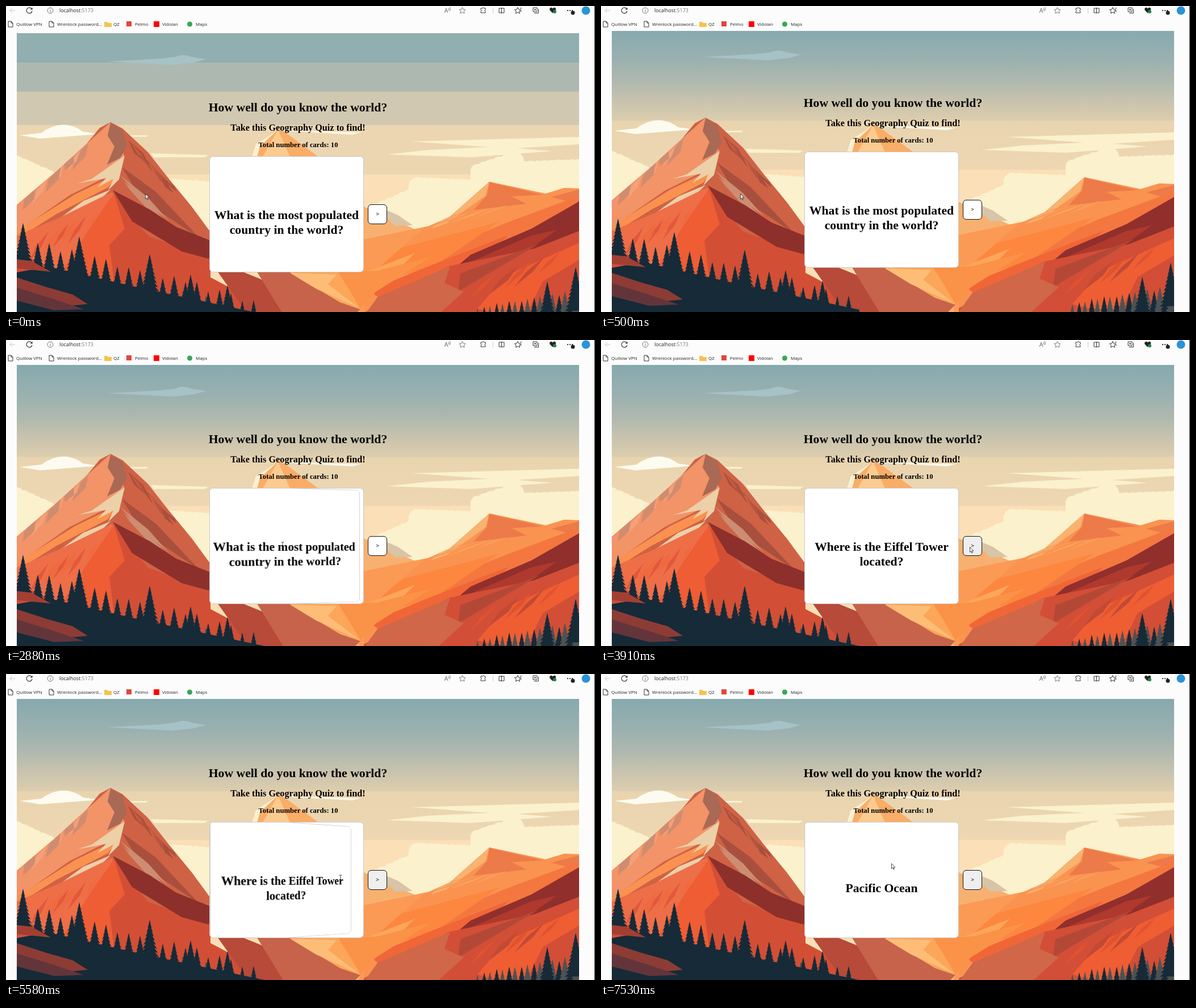
Write an HTML page that moves like this. It is 1037x540 px and loops after 8000 ms.

```html
<!DOCTYPE html>
<html lang="en">
<head>
<meta charset="utf-8">
<title>Geography quiz</title>
<style>
html, body { margin: 0; width: 100%; height: 100%; overflow: hidden; background: #fcfcfc; }
#stage { position: absolute; left: 0; top: 0; width: 1037px; height: 540px; overflow: hidden; }
#stage svg { position: absolute; left: 0; top: 0; }
#view { position: absolute; inset: 44px 0 0; overflow: hidden; }
#page { position: absolute; left: 0; top: -44px; width: 1037px; height: 560px; animation: scroll 8s step-end infinite; }
#bands { animation: bands 8s step-end infinite; }
.bar { font-family: "Open Sans", "Noto Sans", sans-serif; }
.head { font-family: "Liberation Serif", serif; font-weight: bold; text-anchor: middle; }
#card {
  position: absolute; left: 358px; top: 261px; width: 272px; height: 205px; box-sizing: border-box;
  border: 1px solid #c8c8c8; border-radius: 7px; background: #fff; overflow: hidden; perspective: 675px;
}
#flip { position: absolute; inset: 0; transform-style: preserve-3d; animation: flip 8s ease infinite; }
.face {
  position: absolute; inset: -1px; box-sizing: border-box; padding-top: 30px;
  display: grid; place-content: center; place-items: center; text-align: center; white-space: pre;
  border: 1px solid #d0d0d0; border-radius: 7px; background: #fff; backface-visibility: hidden;
  font: bold 21.7px/25.5px "Liberation Serif", serif; color: #000;
}
.back { transform: rotateY(180deg); }
.face span { grid-area: 1 / 1; animation: first 8s step-end infinite; }
.face span:nth-child(2) { animation-name: second; }
.face span:nth-child(3) { animation-name: third; }
#next {
  position: absolute; left: 637px; top: 346px; width: 34px; height: 35px; box-sizing: border-box;
  border: 1.4px solid #111; border-radius: 6px; background: #fff; animation: press 8s step-end infinite;
  font: 9.5px/31px "Liberation Sans", sans-serif; text-align: center; color: #000;
}
#cursor { position: absolute; left: 0; top: 0; animation: move 8s linear infinite; }
#cursor svg { overflow: visible; }
#arrow { animation: arrow 8s step-end infinite; }
#beam { animation: beam 8s step-end infinite; }
#edge { position: absolute; inset: 0; border: solid #222; border-width: 0 1px 0 0; }

@keyframes scroll {
  0% { transform: translateY(4px); }
  4.625% { transform: none; }
  6.25% { transform: translateY(-4px); }
  8.125%, 100% { transform: none; }
}
@keyframes bands { 0% { opacity: 1; } 1.5%, 100% { opacity: 0; } }
@keyframes flip {
  0%, 20.85% { transform: rotateY(0deg); }
  28.35%, 30.75% { transform: rotateY(180deg); }
  38.25%, 56.5% { transform: rotateY(0deg); }
  64%, 65.5% { transform: rotateY(180deg); }
  73%, 87.2% { transform: rotateY(0deg); }
  94.7%, 100% { transform: rotateY(180deg); }
}
@keyframes first { 0% { visibility: visible; } 45.375%, 100% { visibility: hidden; } }
@keyframes second { 0%, 77.375% { visibility: hidden; } 45.375% { visibility: visible; } 100% { visibility: hidden; } }
@keyframes third { 0% { visibility: hidden; } 77.375%, 100% { visibility: visible; } }
@keyframes press { 0% { background: #fff; } 41.9%, 100% { background: #efefef; } }
@keyframes move {
  0%, 11.4% { transform: translate(245px, 331px); }
  11.5%, 13.8% { transform: translate(423px, 331px); }
  13.9%, 22.2% { transform: translate(481.5px, 362px); }
  36%, 37.5% { transform: translate(487px, 362px); }
  43.5%, 49% { transform: translate(649px, 365px); }
  55%, 71% { transform: translate(589px, 360px); }
  75.8%, 77.3% { transform: translate(643px, 364px); }
  80.9% { transform: translate(622px, 361px); }
  84.25%, 100% { transform: translate(511px, 334px); }
}
@keyframes arrow { 0%, 41.9%, 74.2%, 100% { opacity: 1; } 13.875%, 55% { opacity: 0; } }
@keyframes beam { 0%, 41.9%, 74.2%, 100% { opacity: 0; } 13.875%, 55% { opacity: 1; } }
</style>
</head>
<body>
<div id="stage">
  <div id="view"><div id="page">
    <svg width="1037" height="560">
      <defs>
        <linearGradient id="sky" gradientUnits="userSpaceOnUse" x1="0" y1="44" x2="0" y2="300">
          <stop offset="0" stop-color="#86a9ae"/>
          <stop offset=".2" stop-color="#99b0b0"/>
          <stop offset=".36" stop-color="#aeb8ae"/>
          <stop offset=".5" stop-color="#c8c3ae"/>
          <stop offset=".63" stop-color="#dccdae"/>
          <stop offset=".64" stop-color="#e9d4b0"/>
          <stop offset=".97" stop-color="#eed7b2"/>
          <stop offset=".975" stop-color="#fadfb7"/>
        </linearGradient>
        <clipPath id="frame"><path d="M19 44H1009V560H19Z"/></clipPath>
        <path id="leftPeak" d="M184 201 205 212 250 254 286 300 327 350 360 395V475L520 560H19V347L93 284 142 239 165 211Z"/>
        <path id="rightPeak" d="M736 388 781 368 851 306 950 327 983 317 1009 318V560H630V480Z"/>
        <clipPath id="inLeft"><use href="#leftPeak"/></clipPath>
        <clipPath id="inRight"><use href="#rightPeak"/></clipPath>
      </defs>
      <g clip-path="url(#frame)">
        <path fill="url(#sky)" d="M19 44H1010V560H19Z"/>
        <g id="bands">
          <path fill="#91aeb1" d="M19 44H1010V97H19Z"/>
          <path fill="#adb9b0" d="M19 96H1010V148H19Z"/>
          <path fill="#d0c8b0" d="M19 147H1010V206H19Z"/>
          <path fill="#ecd6b1" d="M19 206H1010V293H19Z"/>
        </g>
        <path fill="#a6c2c6" d="M178 94 270 89 297 86Q312 79 328 86L352 90 330 96 292 100Z"/>
        <path fill="#fdfbef" d="M24 224 62 220Q100 192 136 218L164 222 60 230Z"/>
        <path fill="#fbf1cd" d="M190 224H250L247 227H190ZM255 256 356 259 350 263H260ZM714 235 1009 227V240L900 247 962 252 818 263 671 258 744 250 850 245Z"/>
        <path fill="#fbf8ea" d="M430 213 625 219 610 223Z"/>
        <g id="clouds" fill="#fbf1cd"></g>

        <path fill="#f9ad67" d="M433 262 438 242 479 213 493 220 550 262Z"/>
        <path fill="#fbf0d2" d="M433 262 439 241 479 214 447 244 442 262Z"/>
        <path fill="#fbcb90" d="M452 262 479 214 500 262Z"/>

        <path fill="#f7b070" d="M630 350 725 392 800 370V560H480V470H630Z"/>
        <path fill="#d8c4a6" d="M646 346 690 365 716 383 685 384Z"/>
        <path fill="#fb9a55" d="M630 408 770 379 830 400 790 560H620Z"/>

        <use href="#rightPeak" fill="#fa9350"/>
        <g clip-path="url(#inRight)">
          <path fill="#f9b270" d="M748 389 802 347 851 306 844 331 775 380Z"/>
          <path fill="#ed7a49" d="M851 307 945 329 890 332 916 345 823 356 847 330ZM960 333 1009 320V346Z"/>
          <g id="rightGlow"></g>
          <path fill="#f47740" d="M1009 331 880 379 812 407 740 463 875 440 1009 357Z"/>
          <path fill="#fd873f" d="M690 424 868 377 745 461 630 484Z"/>
          <path fill="#f06637" d="M640 498 732 460 885 400 848 439 680 530Z"/>
          <path fill="#902f2c" d="M1009 341 925 389 818 435 780 467 800 505 1009 440Z"/>
          <path fill="#af392d" d="M780 464 925 401 970 391 887 450 770 520Z"/>
          <path fill="#d24e36" d="M625 540 780 455 930 424 1009 393V560H610Z"/>
          <path fill="#b44837" d="M800 468 938 416 865 459 796 500Z"/>
          <path fill="#ef5d33" d="M830 530 880 472 1009 414V444L945 482 910 552Z"/>
          <g id="rightShade"></g>
        </g>
        <path fill="#cf6748" d="M618 560 654 510 782 455 772 485 806 500 740 560Z"/>

        <use href="#leftPeak" fill="#cf6245"/>
        <g clip-path="url(#inLeft)">
          <path fill="#f29368" d="M184 201 142 239 19 347V395L112 330 190 291 208 260Z"/>
          <path fill="#a96955" d="M184 202 179 225 191 244 178 276 201 264 213 244 205 215Z"/>
          <g id="leftGlow"></g>
          <path fill="#a94f3d" d="M204 280 264 324 340 405 238 337Z"/>
          <g id="leftShade"></g>
          <path fill="#fa9150" d="M19 393 122 328 197 292 180 316 89 363 19 407Z"/>
          <path fill="#ecd0a7" d="M209 260 151 301 126 309 176 300 161 316 189 301 180 321 199 302ZM184 320 136 340 52 402 151 352Z"/>
          <path fill="#ee6e48" d="M19 401 93 370 187 324 193 352 100 475H19Z"/>
          <path fill="#ef5d34" d="M190 327 152 381 95 470 250 500 254 417Z"/>
          <path fill="#d24f35" d="M190 326 250 402 360 440 520 560H200L182 418 209 389Z"/>
          <g id="leftFoot"></g>
          <path fill="#8d302b" d="M188 321 253 355 300 386 360 410V443L309 429 222 376Z"/>
        </g>

        <path fill="#b74a39" d="M355 440 478 490 530 560H440Z"/>
        <path fill="#c7634a" d="M440 462 502 466 585 515 624 531 595 560H500Z"/>
        <path fill="#fca65a" d="M495 463H640L720 432 640 511 623 531 588 519Z"/>
        <path fill="#fdbd77" d="M500 467 582 470 567 487 622 529 546 495Z"/>
        <path fill="#fa9247" d="M585 466 655 463 750 438 650 501 624 530 604 496Z"/>

        <path fill="#d04d37" d="M19 428 82 461 19 476Z"/>
        <g id="trees"></g>
        <path fill="#162a38" d="M19 466 75 456 230 492 455 540V560H19Z"/>
        <path fill="#a33f32" d="M19 443 45 446 79 465 19 459Z"/>
        <path fill="#8c3c35" d="M19 475 71 492 117 505 144 522 92 527 58 511 19 505Z"/>
        <path fill="#63353a" d="M19 493 77 511 137 531 85 533 19 516Z"/>
      </g>
      <g class="head">
        <text x="514" y="182" font-size="21.7">How well do you know the world?</text>
        <text x="514" y="216.3" font-size="16.25">Take this Geography Quiz to find!</text>
        <text x="514.5" y="244.8" font-size="12.66">Total number of cards: 10</text>
      </g>
    </svg>
    <div id="card"><div id="flip">
      <div class="face"><span>What is the most populated
country in the world?</span><span>Where is the Eiffel Tower
located?</span><span>What is the largest ocean in
the world?</span></div>
      <div class="face back"><span>China</span><span>Paris, France</span><span>Pacific Ocean</span></div>
    </div></div>
    <div id="next">&gt;</div>
  </div></div>

  <svg class="bar" width="1037" height="44" fill="none" stroke="#333">
    <path stroke="#c4c4c4" d="M16 8H7M11 4 7 8 11 12"/>
    <path stroke-width="1.2" d="M45.5 5.5A5 5 0 1 0 46 9M46 3V6H43"/>
    <g stroke="#777"><circle cx="78" cy="8" r="5"/><path d="M78 7V11M78 5V6"/></g>
    <g stroke="none" fill="#222" font-size="8">
      <text x="94" y="11" font-size="8.9">localhost<tspan fill="#777">:5173</tspan></text>
      <text x="18" y="35">Quillow VPN</text>
      <text x="90" y="35">Wrenlock password...</text>
      <text x="189" y="35">QZ</text>
      <text x="227" y="35">Pelmo</text>
      <text x="275" y="35">Vidolan</text>
      <text x="334" y="35">Maps</text>
    </g>
    <path id="file" d="M4 27H9L12 30V37H4ZM9 27V30H12"/>
    <use href="#file" x="72"/>
    <path stroke="none" fill="#f5c34e" d="M173 28H178L180 30H186V37H173Z"/>
    <path stroke="none" fill="#e2463b" d="M212 27H221V36H212Z"/>
    <path stroke="none" fill="#f00" d="M260 27H270V37H260Z"/>
    <circle cx="323.5" cy="32" r="4.5" fill="#34a853" stroke="none"/>
    <g stroke="#777">
      <path d="M772 12 775 4 778 12M773 9H777M779 4Q781 6 779 8M781 2Q784 5 781 9"/>
      <path id="star" d="M803.5 2.5 805.2 6 809 6.5 806.3 9.2 807 13 803.5 11.2 800 13 800.7 9.2 798 6.5 801.8 6Z"/>
    </g>
    <path d="M836 4H839Q840 1 842 4H844V7Q841 8 844 10V12H836V10Q839 8 836 7Z"/>
    <path stroke="#ccc" d="M857.5 3V13"/>
    <path d="M868 4H877V12H868ZM872.5 3V13"/>
    <use href="#star" x="97.5"/>
    <path d="M905 4H908M905 9H908M928 3H935V10H928ZM930 12.5H937.5V5M931.5 5V8M930 6.5H933"/>
    <path fill="#222" d="M962.5 12Q955 6 958.5 3.5 961 2 962.5 5 964 2 967 3.5 970 7 962.5 12Z"/>
    <circle cx="966" cy="10" r="3" fill="#23824a" stroke="none"/>
    <path stroke-width="2" stroke-dasharray="2 2" d="M988 8H998"/>
    <circle cx="998" cy="12" r="3.5" fill="#222" stroke="none"/>
    <circle cx="1021" cy="8" r="7.5" fill="#2a94d6" stroke="none"/>
  </svg>
  <div id="cursor">
    <svg width="8" height="12" stroke="#222" stroke-width=".8">
      <path id="arrow" fill="#fff" d="M.5 .5V9.5L2.5 7.6 4 11 5.3 10.4 3.9 7.2H6.9Z"/>
      <path id="beam" fill="none" d="M-2.5-5H2.5M0-5V5M-2.5 5H2.5"/>
    </svg>
  </div>
  <div id="edge"></div>
</div>
<script>
const NAVY = "#162a38", GREY = "#4c5352";
let seed = 11;
const rand = () => (seed = seed * 16807 % 2147483647) / 2147483647;
const mix = (a, b, k) => a + (b - a) * k;
const add = (id, markup) => document.getElementById(id).innerHTML += markup;

// A bank of round puffs whose tops follow the line from one point to another.
function cloud(x0, y0, x1, y1) {
  const n = Math.ceil(Math.abs(x1 - x0) / 13);
  for (let i = 0; i <= n; i++) {
    const x = mix(x0, x1, i / n), y = mix(y0, y1, i / n), r = 12 + rand() * 8;
    add("clouds", `<circle cx="${x}" cy="${y + r}" r="${r}"/><path d="M${x - 12} ${y + r}h24V420h-24Z"/>`);
  }
}

// Rock slivers that start along a ridge and run down the slope (dx, dy).
function slivers(id, n, [x0, y0], [x1, y1], [dx, dy], fills) {
  for (let i = 0; i < n; i++) {
    const k = (i + rand()) / n, len = .5 + rand() * .6, w = 3 + rand() * 6;
    const x = mix(x0, x1, k), y = mix(y0, y1, k), mx = dx * len / 2, my = dy * len / 2;
    add(id, `<path fill="${fills[i % fills.length]}" d="M${x} ${y}l${mx + w} ${my} ${mx - w} ${my} ${-mx - w} ${-my}Z"/>`);
  }
}

function tree(x, top, fill = NAVY) {
  const h = 66 + rand() * 14, tiers = 11;
  let right = "", left = "";
  for (let i = 1; i <= tiers; i++) {
    const k = i / tiers, w = h * .25 * k, y = top + h * k;
    right += `L${x + w} ${y}L${x + w * .65} ${y - 1}`;
    left = `L${x - w * .65} ${y - 1}L${x - w} ${y}` + left;
  }
  add("trees", `<path fill="${fill}" d="M${x} ${top}${right}${left}Z"/>`);
}

cloud(19, 260, 85, 290);
cloud(285, 300, 358, 305);
cloud(640, 350, 715, 318);
cloud(725, 298, 820, 302);
cloud(830, 275, 895, 253);
cloud(900, 270, 1009, 266);

slivers("leftGlow", 7, [160, 225], [50, 320], [-30, 50], ["#d08c6f", "#f3a178"]);
slivers("leftShade", 8, [205, 222], [285, 310], [50, 60], ["#a94f3d", "#cf6245", "#b55541"]);
slivers("leftShade", 3, [198, 290], [215, 320], [85, 80], ["#cd8d72"]);
slivers("leftFoot", 6, [180, 350], [60, 400], [-35, 55], ["#f06a40", "#e2583a"]);
slivers("rightGlow", 5, [900, 345], [800, 360], [-80, 30], ["#f9a55f", "#f79d5c"]);
slivers("rightShade", 5, [990, 425], [850, 470], [-60, 60], ["#e0532f", "#c24a35"]);

// The wood falls away to the right, with a few taller firs.
for (const x of [312, 352, 376]) tree(x, 416 + x * .26, GREY);
for (let x = 56; x < 450; x += 20) tree(x, 392 + x * .27 + rand() * 12);
tree(30, 379);
tree(129, 403);
tree(253, 434);
tree(325, 470);
tree(390, 489);

for (let x = 830; x < 1009; x += 22) {
  tree(x, 530 - (x - 830) * .2, GREY);
  tree(x + 12, 519 - (x - 830) * .15 + rand() * 8);
}
tree(953, 482);
tree(1003, 457);
</script>
</body>
</html>
```
